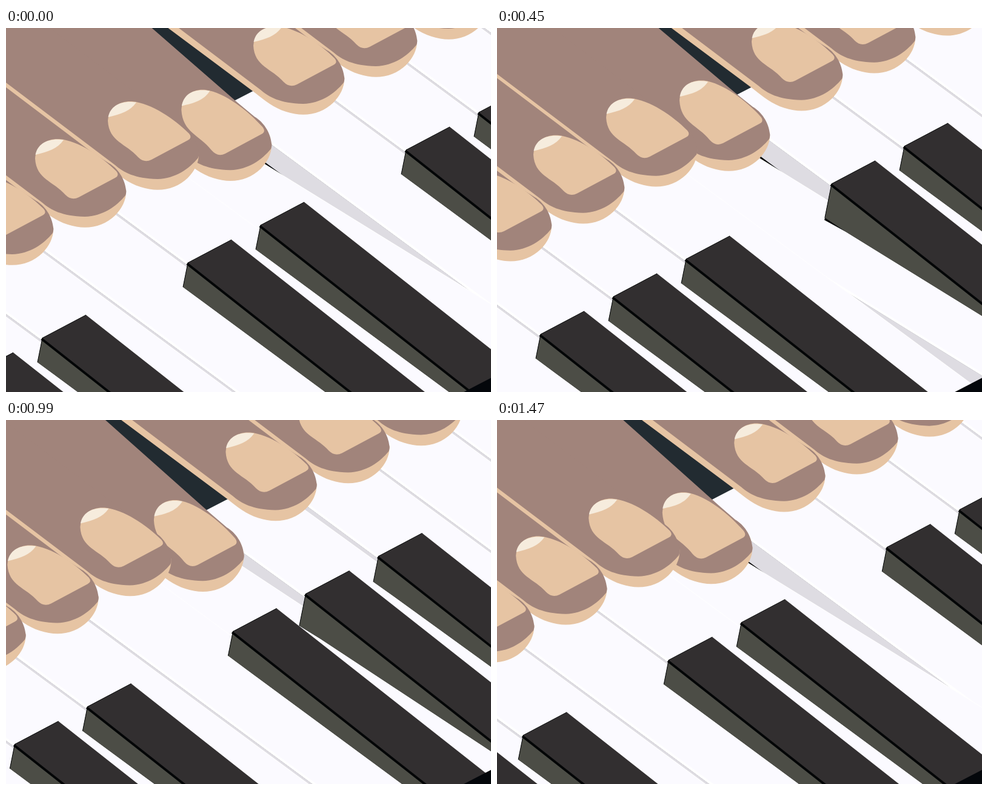
These frames come from a looping animation (800 px wide and 600 px high, 1500 ms). An HTML page with a canvas:

```html
<!DOCTYPE html>
<html lang="en">
<head>
<meta charset="utf-8">
<title>Piano</title>
<style>
html, body { margin: 0; width: 100%; height: 100%; overflow: hidden; }
canvas { display: block; }
</style>
</head>
<body>
<canvas id="stage" width="800" height="600"></canvas>
<script>
const ctx = document.getElementById('stage').getContext('2d');
const LOOP = 1500, STEP = 30, OCTAVE = 7;
const DX = 120, DY = -62;              // distance from one key to the next
const SLOPE = 0.737, TOP_SLOPE = 0.787;
const HINGE = 372, KEY_END = 537;      // measured along a key
const SKIN = '#a1847b', PALM = '#e6c4a3';

const underside = new Path2D('M-867 -542 L171 231 C186 243 202 256 222 262 C252 272 280 266 300 247 C312 235 319 220 318 205 L290 190 L-800 -600Z');
const nail = new Path2D('M168 153 C170 130 188 120 208 121 C240 124 278 150 302 174 Q308 181 300 185 L240 217 Q228 223 218 213 C198 190 170 188 168 153Z');
const moon = new Path2D('M168.500 147 C172 128 190 119 215 122.500 C205 137 190 142 168.500 147Z');

// The knuckle end stays behind while the tip drops
const backOfFinger = drop => new Path2D(`M-820 -529 L180 226 C194 238 212 248 250 249
  C280 248 302 232 317 214 Q319 209 318 205 C316 186 304 169 290 161
  L262 ${143 - 0.12 * drop} L-738 ${-612 - 2.8 * drop}Z`);

const smooth = (from, to, x) => {
  const k = Math.min(1, Math.max(0, (x - from) / (to - from)));
  return k * k * (3 - 2 * k);
};
const screenX = u => 288 + DX * u;

// Tilt of a white key and drop of a finger, by place on the stage
const keyTilt = u => 0.12 * (smooth(213, 262, screenX(u)) - smooth(325, 372, screenX(u)));
const fingerDrop = u => {
  const d = screenX(u) - 258, k = Math.abs(d) / (d < 0 ? 85 : 100);
  return k < 1 ? 27 * (1 + Math.cos(Math.PI * k)) : 0;
};

function poly(color, points) {
  ctx.beginPath();
  points.forEach(([x, y]) => ctx.lineTo(x, y));
  ctx.closePath();
  ctx.fillStyle = color;
  ctx.fill();
}

function line(width, points) {
  ctx.beginPath();
  points.forEach(([x, y]) => ctx.lineTo(x, y));
  ctx.lineWidth = width;
  ctx.strokeStyle = '#030506';
  ctx.stroke();
}

function fill(color, path) {
  ctx.fillStyle = color;
  ctx.fill(path);
}

// a runs across the keyboard, s along a key
const place = (u, a, s, tilt = 0) => [
  357 + DX * u + a + s,
  132.5 + DY * (u + a / DX) + SLOPE * s + tilt * (HINGE - s)
];

function band(color, from, to) {
  poly(color, [place(0, -1500, from), place(0, 1500, from), place(0, 1500, to), place(0, -1500, to)]);
}

function whiteKey(u) {
  const tilt = keyTilt(u), front = -2, back = KEY_END + 80;
  const at = (a, s) => place(u - 1, a, s, tilt);
  const strip = (color, a, b) => poly(color, [at(a, front), at(a, back), at(b, back), at(b, front)]);
  const near = at(0, front), far = at(0, back);
  poly('#dedce2', [near, far, [far[0], far[1] + 37], [near[0], near[1] + 37]]);
  strip('#fbfaff', 0, 116.4);
  strip('#fff', 0, 4);
  strip('#fff', 115.6, 116.4);
}

function blackKey(u) {
  const tilt = keyTilt(u), sink = s => tilt * (HINGE - s);
  const length = 420, rise = length * TOP_SLOPE;
  const wall = (color, drop) => poly(color, [
    [183, 130],
    [175 - drop / 5, 170 + drop],
    [207, 193.6 + sink(240)],
    [175 + length, 170 + length * SLOPE + sink(208 + length)],
    [183 + length, 130 + rise]
  ]);
  const drop = sink(208), shown = Math.min(drop, 16);
  ctx.save();
  ctx.translate(357 + DX * u, 133 + DY * u);
  wall('#030506', drop);
  wall('#4c4d46', shown);
  line(1, [[183, 130], [175 - shown / 5, 170 + shown]]);
  line(5, [[182, 131], [182 + length, 131 + rise]]);
  poly('#322f30', [[255, 92], [183, 130], [183 + length, 130 + rise], [255 + length, 92 + rise]]);
  line(1, [[183, 130], [255, 92]]);
  ctx.restore();
}

function finger(u) {
  const drop = fingerDrop(u);
  ctx.save();
  ctx.translate(DX * (u + 1), DY * (u + 1));
  ctx.save();
  ctx.translate(0, 1.1 * drop);
  fill(PALM, underside);
  fill(SKIN, backOfFinger(drop));
  ctx.restore();
  // The nail turns towards the viewer as the finger goes down
  ctx.transform(1, 0.001 * drop, 0, 1 + 0.0019 * drop, 0.03 * drop, 0.564 * drop);
  fill(PALM, nail);
  fill('#f6ecdd', moon);
  ctx.restore();
}

function draw(time) {
  const pan = OCTAVE * Math.floor(time % LOOP / STEP) * STEP / LOOP;
  const first = 6 - Math.floor(pan), last = first - 14;
  ctx.fillStyle = '#222b31';
  ctx.fillRect(0, 0, 800, 600);
  band('#030506', 10, KEY_END);
  for (let i = first; i >= last; i--) {
    const note = (i % OCTAVE + OCTAVE) % OCTAVE;
    whiteKey(i + pan);
    if (note !== 0 && note !== 4) blackKey(i + pan);
  }
  band('#04070b', KEY_END, 2000);
  for (let i = first; i >= last; i--) finger(i + pan);
}

function tick() {
  draw(performance.now());
  requestAnimationFrame(tick);
}
tick();
</script>
</body>
</html>
```
